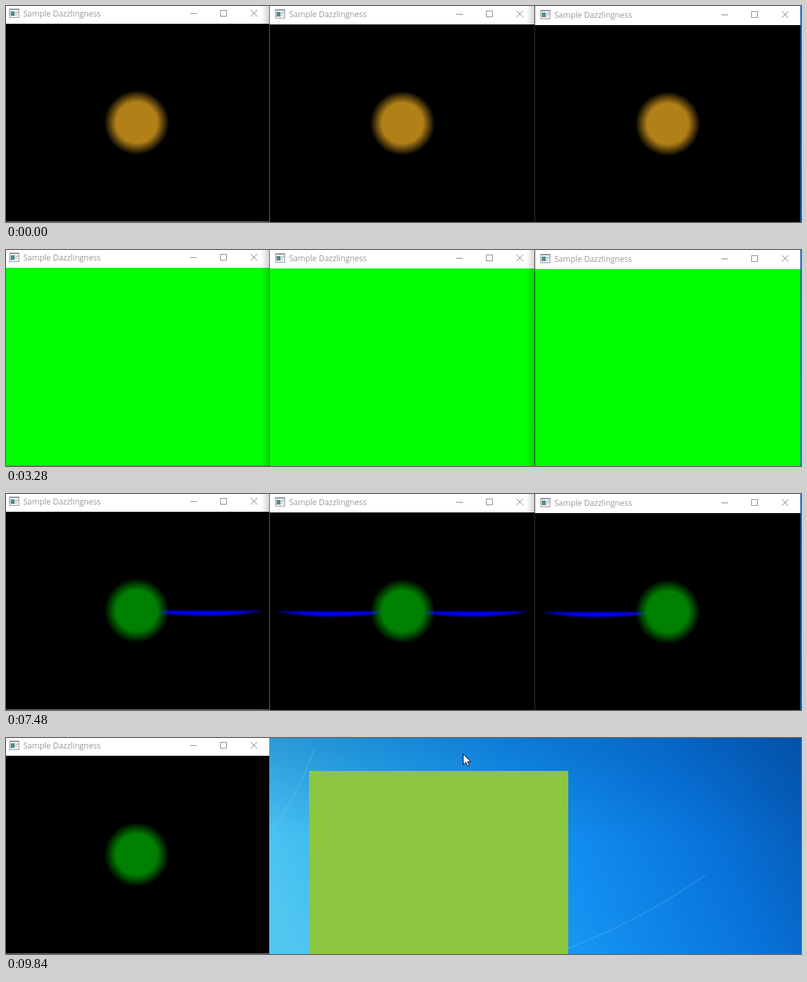
These frames come from a looping animation (1199x328 px, 9.88 s). An HTML page with a canvas:

```html
<!DOCTYPE html>
<html lang="en">
<head>
<meta charset="utf-8">
<title>Linked windows</title>
<style>
html, body { margin: 0; width: 1199px; height: 328px; overflow: hidden; background: #000; }
canvas { display: block; }
</style>
</head>
<body>
<canvas id="stage" width="1199" height="328"></canvas>
<script>
const c = document.getElementById('stage').getContext('2d');
const LOOP = 9880, STEP = 40, TITLE = 'Sample Dazzlingness';

// Each window: frame, origin of the title bar parts, circle centre, closing time
const windows = [
  { x: 0, w: 397, bar: 27, ox: 0, oy: 0, cx: 197, cy: 177, close: Infinity },
  { x: 398, w: 400, bar: 28, ox: 401, oy: 1, cx: 598, cy: 178, close: 9480 },
  { x: 798, w: 400, bar: 29, ox: 801, oy: 2, cx: 998, cy: 179, close: 8206 }
];

const clamp = v => Math.max(0, Math.min(1, v));
const ramp = (t, a, b) => clamp((t - a) / (b - a));
const ease = v => v * v * (3 - 2 * v);
const mix = (a, b, k) => a + (b - a) * k;
const bump = (t, a, b) => Math.sin(Math.PI * ramp(t, a, b)) ** 2;

function rect(color, x, y, w, h) {
  c.fillStyle = color;
  c.fillRect(x, y, w, h);
}

function gradient(x0, y0, x1, y1, colors) {
  const g = c.createLinearGradient(x0, y0, x1, y1);
  colors.forEach((color, i) => g.addColorStop(i / (colors.length - 1), color));
  return g;
}

function drawDesktop() {
  rect(gradient(420, 300, 1199, -60, ['#52c8f1', '#2baef0', '#1390f0', '#0873da', '#0450a6']), 0, 0, 1199, 328);
  rect(gradient(0, 0, 0, 150, ['rgba(0,75,155,.3)', 'rgba(0,75,155,0)']), 0, 0, 1199, 150);
  c.strokeStyle = 'rgba(150,215,255,.25)';
  c.lineWidth = 1.5;
  c.beginPath();
  c.moveTo(825, 328);
  c.quadraticCurveTo(955, 280, 1055, 208);
  c.moveTo(400, 140);
  c.quadraticCurveTo(445, 80, 465, 15);
  c.stroke();
  rect('#8cc63f', 457, 50, 391, 391);
}

function drawBar(win) {
  rect('#fff', win.x, 0, win.w, win.bar);
  c.save();
  c.translate(win.ox, win.oy);
  rect('#8b9499', 5, 4, 15, 14);
  rect('#f4f6f7', 6, 6, 13, 11);
  rect('#4d8f8c', 7, 8, 6, 7);
  rect('#c3ced3', 14, 8, 2, 7);
  rect('#7d9aa0', 17, 8, 1, 3);
  c.fillStyle = '#999';
  c.font = '12px "Open Sans", "Noto Sans", sans-serif';
  c.fillText(TITLE, 26, 16);
  c.strokeStyle = '#888';
  c.lineWidth = 1;
  c.strokeRect(323.5, 6.5, 9, 9);
  c.beginPath();
  c.moveTo(278, 11.5); c.lineTo(288, 11.5);
  c.moveTo(369, 6); c.lineTo(379, 16);
  c.moveTo(379, 6); c.lineTo(369, 16);
  c.stroke();
  c.restore();
}

function drawBeam(win, dir, t, grow) {
  const pulse = (1 - Math.cos((t - 7600) / 1240 * 2 * Math.PI)) / 2;
  const peak = grow * (105 + 55 * pulse), tip = grow * (190 + 22 * pulse);
  const depth = 7 + 2.2 * pulse;
  if (tip < 30) return;
  c.save();
  c.translate(win.cx, win.cy + 1.5);
  c.scale(dir, 1);
  c.filter = 'blur(1.5px)';
  c.fillStyle = '#00f';
  c.beginPath();
  c.moveTo(28, -1);
  c.lineTo(tip, -1);
  for (let x = tip; x >= 28; x -= 3) {
    const q = x < peak ? x / peak : (tip - x) / (tip - peak);
    c.lineTo(x, -1 + depth * Math.sin(q * Math.PI / 2));
  }
  c.fill();
  c.restore();
}

function drawCircle(x, y, rgb) {
  const r = 49, g = c.createRadialGradient(x, y, 31, x, y, r);
  g.addColorStop(0, `rgba(${rgb},1)`);
  g.addColorStop(1, `rgba(${rgb},0)`);
  rect(g, x - r, y - r, 2 * r, 2 * r);
}

function drawWindow(win, i, t) {
  const gone = ramp(t, win.close, win.close + 160);
  if (gone === 1) return;
  c.save();
  c.globalAlpha = 1 - gone;
  const size = 1 - 0.035 * gone;
  c.translate(win.cx, 164);
  c.scale(size, size);
  c.translate(-win.cx, -164);
  if (i) {
    // Shadow and border on the left side
    rect(gradient(win.x - 13, 0, win.x - 1, 0, ['rgba(0,0,0,0)', 'rgba(0,0,0,.18)']), win.x - 13, 0, 12, 328);
    rect(i === 1 ? '#666' : '#333', win.x - 1, 0, 1, 328);
  }
  c.beginPath();
  c.rect(win.x, 0, win.w, 328);
  c.clip();
  rect('#000', win.x, 0, win.w, 328);

  const join = ease(ramp(t, 600, 1080));
  const linkA = join * (1 - ramp(t, 9600, 9800));
  const linkB = join * (1 - ramp(t, 8480, 8720));
  if (i > 0) drawBeam(win, -1, t, i === 1 ? linkA : linkB);
  if (i < 2) drawBeam(win, 1, t, i === 0 ? linkA : linkB);

  // Neighbours push apart, first the left pair and then the right pair
  const pushA = 50 * bump(t, 5400, 6240), pushB = 50 * bump(t, 6400, 7240);
  const shift = [-pushA, pushA - pushB, pushB][i];
  drawCircle(win.cx + shift, win.cy, [mix(178, 0, join), 128, mix(24, 0, join)]);

  const flash = ramp(t, 2560, 3280) * (1 - ramp(t, 4280, 4900));
  rect(`rgba(0,255,0,${flash})`, win.x, win.bar, win.w, 328);
  drawBar(win);
  if (i === 0) rect('#777', 0, 327, 397, 1);
  c.restore();
}

// Pointer stops: time, x, y
const stops = [
  [7840, 1199, 70], [8120, 1178, 14], [8240, 1178, 14], [8360, 1187, 18],
  [8520, 1187, 18], [9240, 775, 13], [9480, 775, 13], [9840, 690, 24]
];

function drawPointer(t) {
  if (t < stops[0][0]) return;
  let n = stops.findIndex(s => s[0] > t);
  if (n < 0) n = stops.length - 1;
  const [t0, x0, y0] = stops[n - 1], [t1, x1, y1] = stops[n];
  const k = ease(ramp(t, t0, t1));
  c.save();
  c.translate(Math.round(mix(x0, x1, k)) - 0.5, Math.round(mix(y0, y1, k)) + 0.5);
  const arrow = new Path2D('M0 0V16L4 12.5L6.5 18L9 17L6.5 11.5H11.5Z');
  c.fillStyle = '#fff';
  c.strokeStyle = '#000';
  c.lineWidth = 1;
  c.fill(arrow);
  c.stroke(arrow);
  c.restore();
}

function draw(now) {
  const t = Math.floor(now % LOOP / STEP) * STEP;
  drawDesktop();
  windows.forEach((win, i) => drawWindow(win, i, t));
  drawPointer(t);
}

const start = performance.now();
function tick() {
  draw(performance.now() - start);
  requestAnimationFrame(tick);
}
tick();
</script>
</body>
</html>
```
